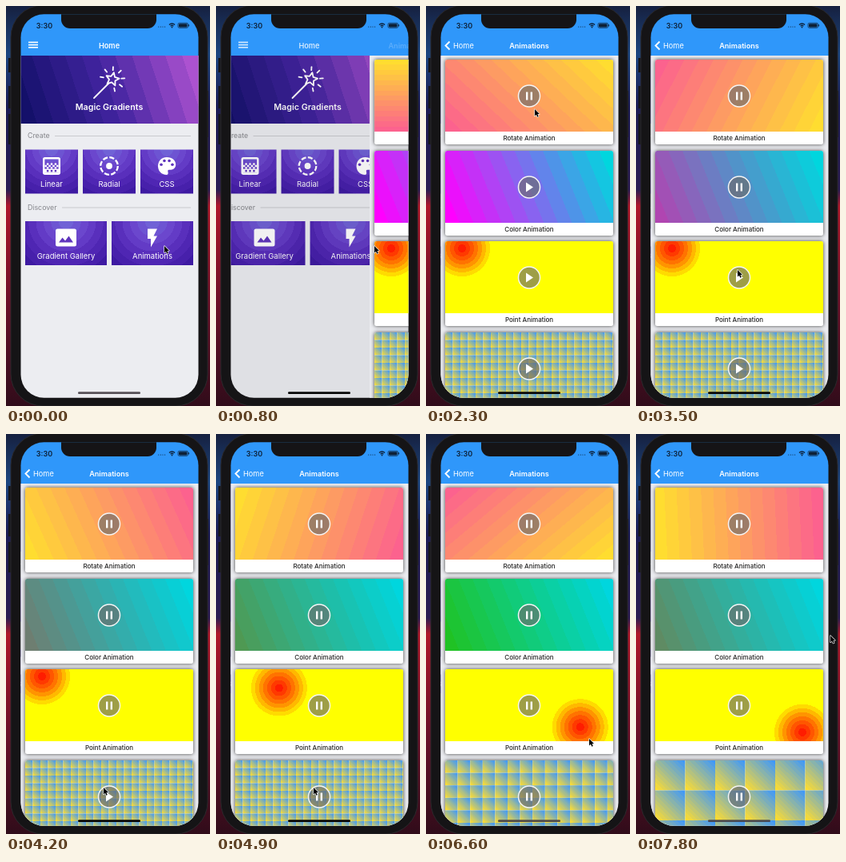
Animation of 255 by 500 pixels, one loop 8 s. Source, as an HTML page with a canvas:

```html
<!DOCTYPE html>
<html lang="en">
<head>
<meta charset="utf-8">
<title>Gradient animations</title>
<style>
html, body { margin: 0; width: 100%; height: 100%; overflow: hidden; background: #141416; }
canvas { display: block; width: 255px; height: 500px; }
</style>
</head>
<body>
<canvas id="stage"></canvas>
<script>
const W = 255, H = 500, LOOP = 8000, TAU = Math.PI * 2;
const FONT = 'Inter, Roboto, sans-serif';
const PAGE = '#ecedf1', BAR = '#2f97fa', BODY = '#151416';
const canvas = document.getElementById('stage');
const c = canvas.getContext('2d');
const dpr = window.devicePixelRatio || 1;
canvas.width = W * dpr;
canvas.height = H * dpr;

const clamp = v => Math.max(0, Math.min(1, v));
const ease = v => { v = clamp(v); return v * v * (3 - 2 * v); };
const lerp = (a, b, p) => a + (b - a) * p;
const mix = (a, b, p) => a.map((v, i) => lerp(v, b[i], p));
const rgb = a => `rgb(${a.map(Math.round).join(',')})`;
const since = (t, start) => Math.max(0, t - start) / 1000;

function tick(t) {
  const step = t < 4200 ? 100 : 400;
  return 4200 + Math.floor((t - 4200) / step) * step;
}

function banded(g, colors, n) {
  for (let i = 0; i < n; i++) {
    const pos = i / (n - 1) * (colors.length - 1);
    const k = Math.min(colors.length - 2, Math.floor(pos));
    const color = rgb(mix(colors[k], colors[k + 1], pos - k));
    g.addColorStop(i / n, color);
    g.addColorStop((i + 1) / n, color);
  }
  return g;
}

// Angle in degrees, clockwise from straight up.
function linear(x, y, w, h, deg, colors, n = 14) {
  const a = deg * Math.PI / 180, sx = Math.sin(a), sy = -Math.cos(a);
  const r = (Math.abs(w * sx) + Math.abs(h * sy)) / 2;
  const mx = x + w / 2, my = y + h / 2;
  return banded(c.createLinearGradient(mx - sx * r, my - sy * r, mx + sx * r, my + sy * r), colors, n);
}

const radial = (x, y, r, colors) => banded(c.createRadialGradient(x, y, 0, x, y, r), colors, 8);

function rect(x, y, w, h, fill) {
  c.fillStyle = fill;
  c.fillRect(x, y, w, h);
}

function roundPath(x, y, w, h, r) {
  c.beginPath();
  c.roundRect(x, y, w, h, r);
}

function roundRect(x, y, w, h, r, fill) {
  roundPath(x, y, w, h, r);
  c.fillStyle = fill;
  c.fill();
}

function disc(x, y, r, fill) {
  c.beginPath();
  c.arc(x, y, r, 0, TAU);
  c.fillStyle = fill;
  c.fill();
}

function poly(points, close = true) {
  c.beginPath();
  points.forEach(([x, y]) => c.lineTo(x, y));
  if (close) c.closePath();
}

function text(s, x, y, size, weight, fill, align = 'center') {
  c.font = `${weight} ${size}px ${FONT}`;
  c.textAlign = align;
  c.textBaseline = 'alphabetic';
  c.fillStyle = fill;
  c.fillText(s, x, y + size * 0.36);
}

function scoped(draw) {
  c.save();
  draw();
  c.restore();
}

/* Home page */

// Icons are drawn around the origin in white; `hole` is the tile colour.
const icons = {
  linear(hole) {
    c.lineWidth = 2.4;
    roundPath(-9.8, -9.8, 19.6, 19.6, 1.5);
    c.stroke();
    const dot = 2.45;
    for (let row = 0; row < 3; row++)
      for (let col = 0; col < 7; col++)
        if ((row + col) % 2) c.fillRect((col - 3.5) * dot, (row - 1.5) * dot, dot, dot);
    c.fillRect(-9, 1.5 * dot, 18, 5);
    for (let i = -1; i <= 1; i++) rect((i * 2 - 0.5) * dot, 2 * dot, dot, dot, hole);
  },
  radial() {
    const seg = 10.8 * TAU / 8;
    c.lineWidth = 2.3;
    c.setLineDash([seg * 0.72, seg * 0.28]);
    c.beginPath();
    c.arc(0, 0, 10.8, 0, TAU);
    c.stroke();
    disc(0, 0, 3.9, '#fff');
  },
  palette(hole) {
    c.beginPath();
    c.moveTo(0, 11);
    c.bezierCurveTo(-14.6, 11, -14.6, -11, 0, -11);
    c.bezierCurveTo(14, -11, 14, 4.8, 5, 4.8);
    c.lineTo(2.8, 4.8);
    c.bezierCurveTo(-1, 5, 4, 10, 0, 11);
    c.fill();
    for (let i = 0; i < 4; i++) {
      const a = Math.PI * (1.08 + i * 0.28);
      disc(7.2 * Math.cos(a), 7.2 * Math.sin(a), 1.8, hole);
    }
  },
  picture(hole) {
    roundRect(-13, -11, 26, 22, 2.5, '#fff');
    c.fillStyle = hole;
    poly([[-9, 6], [-4.5, 0], [-1, 4], [3.5, -2], [9, 6]]);
    c.fill();
  },
  bolt() {
    poly([[-6, -11], [6, -11], [1.5, -2], [6, -2], [-2, 12], [-2, 1.5], [-6, 1.5]]);
    c.fill();
  }
};

function tile(x, y, w, label, icon) {
  const mx = x + w / 2;
  rect(x, y, w, 55, radial(mx, y, Math.hypot(w / 2, 55), [[112, 98, 214], [106, 66, 204], [82, 40, 182], [62, 26, 162]]));
  scoped(() => {
    c.translate(mx, y + 20.5);
    c.fillStyle = c.strokeStyle = '#fff';
    icons[icon]('#5f35bd');
  });
  text(label, mx, y + 43.5, 9.5, 400, '#fff');
}

// A heading and a row of tiles that share the width.
function section(title, y, lineX, items) {
  text(title, 27, y, 8.8, 400, '#85868b', 'left');
  rect(lineX, y, 231 - lineX, 1, '#c9cace');
  const w = (210 - 6 * (items.length - 1)) / items.length;
  items.forEach(([label, icon], i) => tile(24 + i * (w + 6), y + 17.5, w, label, icon));
}

function wand() {
  c.translate(133, 91.5);
  c.strokeStyle = '#fff';
  c.lineWidth = 1.8;
  c.lineCap = c.lineJoin = 'round';
  poly([[-23, 23.5], [-5, 5.5]], false);
  c.stroke();
  const at = (a, r) => [r * Math.cos(a), r * Math.sin(a)];
  poly(Array.from({ length: 10 }, (_, i) => at(i * TAU / 10 - 1.35, i % 2 ? 4 : 8.6)));
  c.stroke();
  for (let i = 0; i < 7; i++) {
    const a = -2.95 + i * 0.72;
    poly([at(a, 11.3), at(a, 15.3)], false);
    c.stroke();
  }
}

function homePage() {
  rect(18, 62, 223, 428, PAGE);
  rect(18, 62, 223, 85, linear(18, 62, 223, 85, 72, [[20, 16, 106], [66, 36, 160], [172, 82, 208]], 12));
  scoped(wand);
  text('Magic Gradients', 129, 126.5, 10.7, 600, '#fff');
  section('Create', 162, 61, [['Linear', 'linear'], ['Radial', 'radial'], ['CSS', 'palette']]);
  section('Discover', 251.5, 70, [['Gradient Gallery', 'picture'], ['Animations', 'bolt']]);
}

/* Animations page */

const YELLOW = [255, 221, 48], PINK = [252, 98, 142], CYAN = [0, 214, 222];

// Turning speeds up once the page has settled.
function turn(t) {
  const s = since(t, 1600);
  return s < 1.9 ? 62 * s : 117 + 184 * Math.min(0.7, s - 1.9) + 106 * Math.max(0, s - 2.6);
}

const cards = [
  {
    label: 'Rotate Animation', start: 1600,
    paint(t, x, y, w, h) {
      rect(x, y, w, h, linear(x, y, w, h, turn(t), [PINK, YELLOW]));
    }
  },
  {
    label: 'Color Animation', start: 2750,
    paint(t, x, y, w, h) {
      const swing = Math.abs(Math.sin(since(t, 2750) * 0.47));
      const from = mix([255, 0, 255], [25, 200, 30], swing);
      rect(x, y, w, h, linear(x, y, w, h, 68, [from, CYAN]));
    }
  },
  {
    label: 'Point Animation', start: 3600,
    paint(t, x, y, w, h) {
      const p = 0.1 + 0.8 * (1 - Math.exp(-0.707 * since(t, 4200) ** 1.25));
      rect(x, y, w, h, radial(x + w * p, y + h * p, 40, [[255, 28, 0], [255, 130, 0], [255, 255, 0]]));
    }
  },
  {
    label: 'Size Animation', start: 4300,
    paint(t, x, y, w, h) {
      const size = 9.5 + 28 * (since(t, 4400) / 3.4) ** 3.5;
      for (let ty = y; ty < y + h; ty += size)
        for (let tx = x; tx < x + w; tx += size)
          rect(tx, ty, size, size, linear(tx, ty, size, size, 225, [[62, 152, 250], YELLOW]));
    }
  }
];

function button(y, playing) {
  disc(129, y, 13.5, 'rgba(108,108,108,.66)');
  c.strokeStyle = '#f4f4f4';
  c.lineWidth = 1.5;
  c.stroke();
  if (playing) {
    rect(125, y - 5, 2.4, 10, '#fff');
    rect(130.6, y - 5, 2.4, 10, '#fff');
  } else {
    c.fillStyle = '#fff';
    poly([[125, y - 6], [134, y], [125, y + 6]]);
    c.fill();
  }
}

function card(t, { label, start, paint }, i) {
  const x = 24, y = Math.round(67 + i * 113.6), w = 210, h = 90;
  scoped(() => {
    c.shadowColor = 'rgba(0,0,0,.75)';
    c.shadowBlur = 5 * dpr;
    roundRect(x, y, w, 106, 2.5, '#fff');
  });
  scoped(() => {
    roundPath(x, y, w, h, [2.5, 2.5, 0, 0]);
    c.clip();
    paint(t, x, y, w, h);
  });
  text(label, 129, y + 98, 8, 500, '#222');
  button(y + 45.5, t >= start);
}

function animationsPage(t) {
  rect(18, 62, 223, 428, PAGE);
  cards.forEach((item, i) => card(t, item, i));
}

/* Phone */

function wallpaper() {
  const g = c.createLinearGradient(0, 0, 0, H);
  g.addColorStop(0, '#16203f');
  g.addColorStop(0.12, '#1c4680');
  g.addColorStop(0.25, '#1c1c54');
  g.addColorStop(0.46, '#2c1c52');
  g.addColorStop(0.5, '#b0182a');
  g.addColorStop(0.75, '#6a1028');
  g.addColorStop(1, '#300c1a');
  rect(0, 0, W, H, g);
}

function shell() {
  for (let i = 0; i < 3; i++) rect(3, 65 + i * 35, 4, 18 + i * 10, '#17171a');
  rect(250, 106, 3, 58, '#17171a');
  roundRect(6, -1, 246, 501, 40, BODY);
  c.strokeStyle = '#2a292c';
  c.lineWidth = 1;
  c.stroke();
}

function statusBar() {
  const ink = '#0d2036';
  roundRect(69, 0, 119, 28, [0, 0, 11, 11], BODY);
  text('3:30', 48, 24.5, 9, 600, ink);
  for (let i = 0; i < 4; i++) disc(190.8 + i * 2.6, 26, 0.6, ink);
  c.strokeStyle = ink;
  c.lineWidth = 1.4;
  [2.6, 5].forEach(r => {
    c.beginPath();
    c.arc(207.5, 27, r, -2.35, -0.79);
    c.stroke();
  });
  disc(207.5, 26.6, 0.9, ink);
  c.lineWidth = 0.7;
  roundPath(215, 21.3, 12.5, 6, 1.6);
  c.stroke();
  roundRect(216, 22.2, 10.5, 4.2, 0.8, ink);
  rect(228.2, 23.2, 0.9, 2.2, ink);
}

function navBar(p) {
  rect(18, 10, 223, 52, BAR);
  c.globalAlpha = 1 - p;
  for (let i = 0; i < 3; i++) rect(28, 44.6 + i * 3.2, 12, 1.6, '#fff');
  text('Home', 129 - 58 * p, 49.5, 9.2, 600, '#fff');
  c.globalAlpha = p;
  text('Animations', 129 + 142 * (1 - p), 49.5, 9.1, 600, '#fff');
  c.globalAlpha = clamp(p * 2 - 1);
  text('Home', 34 + 30 * (1 - p), 49.5, 9.2, 400, '#fff', 'left');
  c.strokeStyle = '#fff';
  c.lineWidth = 1.9;
  poly([[29.5, 44.5], [24.5, 49.5], [29.5, 54.5]], false);
  c.stroke();
  c.globalAlpha = 1;
}

function screen(t) {
  const p = ease((t - 650) / 500);
  roundPath(18.5, 10.3, 222, 479.5, 29);
  c.clip();
  scoped(() => {
    c.translate(-67 * p, 0);
    homePage();
  });
  rect(18, 62, 223, 428, `rgba(0,0,0,${Math.min(0.1, p * 0.25)})`);
  if (p > 0) {
    scoped(() => {
      c.translate(222 * (1 - p), 0);
      animationsPage(t);
    });
  }
  navBar(p);
  statusBar();
  roundRect(90, 482.3, 78, 2.7, 1.4, t >= 700 && t < 5000 ? '#080808' : 'rgba(70,65,72,.9)');
}

// Each stop is an arrival time and a place; every move takes half a second.
const stops = [
  [1500, 136, 126], [2750, 133, 236], [3500, 127, 330],
  [4200, 122, 442], [5800, 204, 381], [7800, 243, 252]
];

function cursor(t) {
  const [x, y] = stops.reduce((at, [time, ...to]) => mix(at, to, ease((t - time) / 500 + 1)), [198, 300]);
  scoped(() => {
    c.translate(x, y);
    c.scale(0.88, 0.88);
    poly([[0, 0], [0, 9.6], [2.2, 7.6], [3.8, 11], [5.4, 10.3], [3.9, 7], [6.8, 6.8]]);
    c.lineJoin = 'round';
    c.lineWidth = 1.4;
    c.strokeStyle = '#fff';
    c.stroke();
    c.fillStyle = '#000';
    c.fill();
  });
}

function frame(now) {
  const t = tick(now % LOOP);
  c.setTransform(dpr, 0, 0, dpr, 0, 0);
  wallpaper();
  shell();
  scoped(() => screen(t));
  cursor(t);
  requestAnimationFrame(frame);
}
requestAnimationFrame(frame);
</script>
</body>
</html>
```
